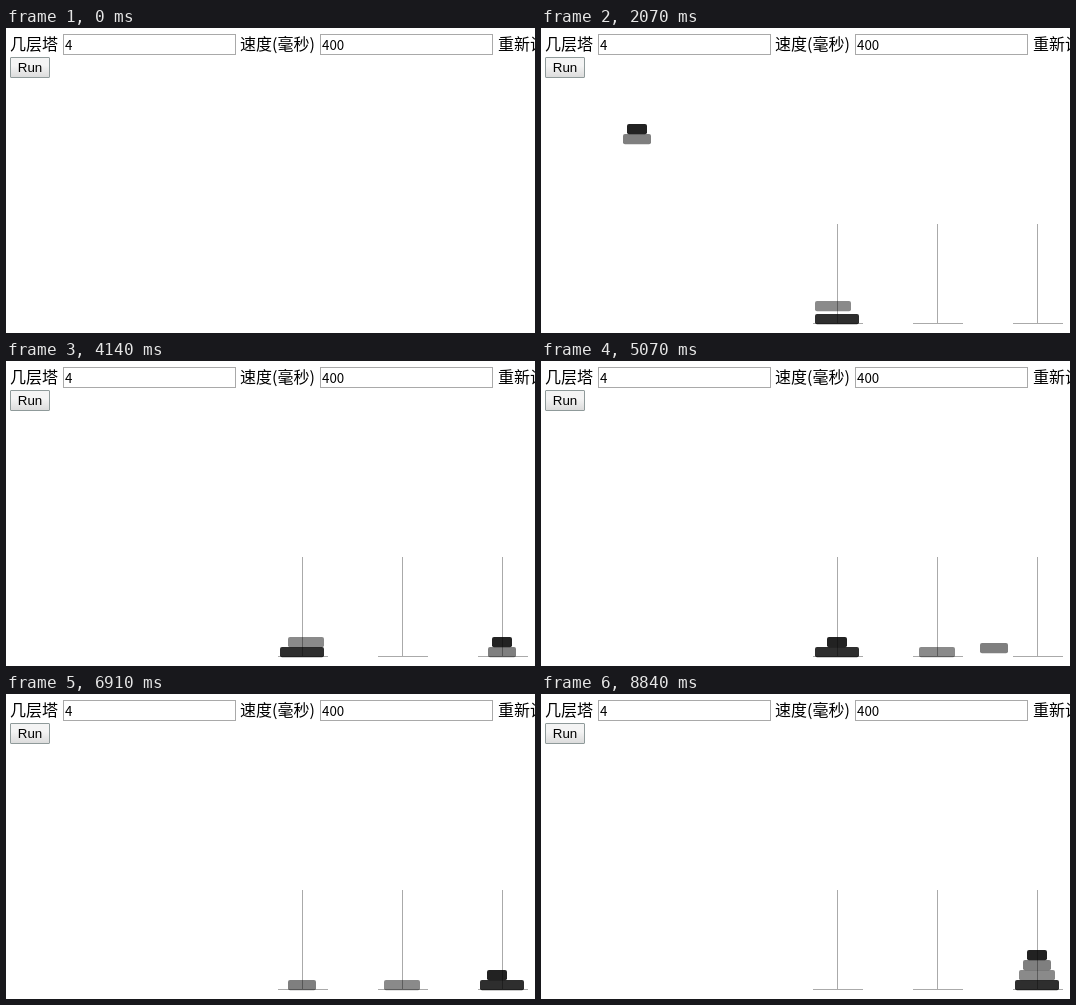
These frames come from a looping animation (529 px wide and 305 px high, 9.53 s). An HTML page:

```html
<!DOCTYPE html>
<html lang="zh-CN">
<head>
<meta charset="utf-8">
<title>Tower of Hanoi</title>
<style>
  html, body { margin: 0; width: 100%; height: 100%; overflow: hidden; background: #fff; }
  #stage { position: relative; width: 529px; height: 305px; overflow: hidden; }
  #stage > * { position: absolute; box-sizing: border-box; white-space: nowrap; }
  .label { top: 3px; font: 16px/24px "Noto Sans CJK SC", "Noto Sans CJK", sans-serif; color: #000; }
  .field {
    top: 6px; width: 173px; height: 21px; padding-left: 1px;
    border: 1px solid #a9a9a9; color: #000;
    font: 13.33px/19px "Noto Sans CJK SC", "Noto Sans CJK", sans-serif;
  }
  #run {
    left: 4px; top: 29px; width: 40px; height: 21px; text-align: center;
    border: 1px solid #8f9a9a; border-radius: 1px;
    background: linear-gradient(#f4f4f4 40%, #dcdcdc);
    font: 13.33px/19px "Liberation Sans", Arial, sans-serif; color: #000;
  }
  #run.hover { border-color: #6f8088; background: linear-gradient(#f8f8f8 40%, #e4e4e4); }
  #run.down { border-color: #5f6f78; background: linear-gradient(#d8d8d8, #ececec); }
  svg { left: 0; top: 0; }
</style>
</head>
<body>
<div id="stage">
  <span class="label" style="left:4px">几层塔</span>
  <span class="field" style="left:57px">4</span>
  <span class="label" style="left:234px">速度(毫秒)</span>
  <span class="field" style="left:314px">400</span>
  <span class="label" style="left:492px">重新设置</span>
  <span id="run">Run</span>
  <svg width="529" height="305">
    <g id="tower">
      <path id="pegs" fill="#aaa" shape-rendering="crispEdges"/>
    </g>
    <path id="cursor" d="M.5 .5V16.5L4.2 13L6.6 18.5L9 17.5L6.6 12.2H11.5Z"
      fill="#fff" stroke="#000" stroke-linejoin="round"/>
  </svg>
</div>
<script>
const LOOP = 9530;
const START = 1365, STEP = 77, LAST_STEP = 97;
const ENTER = 70, ENTER_STEP = 76;
const ALPHA = [0.867, 0.5, 0.46, 0.82];
const SIZE = ALPHA.length;
const PEG_X = [296, 396, 496];

const byId = id => document.getElementById(id);
const tower = byId("tower"), run = byId("run"), cursor = byId("cursor");
const swing = p => 0.5 - Math.cos(Math.PI * p) / 2;
const mix = (a, b, p) => a.map((v, i) => Math.round(v + (b[i] - v) * p));

byId("pegs").setAttribute("d",
  PEG_X.map(x => `M${x} 196h1v99h-1zM${x - 24} 295h50v1h-50z`).join(""));

const disks = ALPHA.map((alpha, i) => {
  const rect = document.createElementNS("http://www.w3.org/2000/svg", "rect");
  const attrs = { width: 20 + 8 * i, height: 10.2, rx: 2, "fill-opacity": alpha };
  for (const key in attrs) rect.setAttribute(key, attrs[key]);
  return tower.appendChild(rect);
});

// Each disk first flies to the left peg, then the puzzle is solved.
const home = disks.map((_, i) => [86 - 4 * i, 96 + 10 * i]);
const moves = [];
const stacks = [[], [], []];
const now = home.slice();

function move(disk, peg) {
  const to = [PEG_X[peg] - 10 - 4 * disk, 286 - 10 * stacks[peg].length];
  moves.push({ disk, from: now[disk], to });
  stacks[peg].push(disk);
  now[disk] = to;
}

function solve(n, from, via, to) {
  if (!n) return;
  solve(n - 1, from, to, via);
  move(stacks[from].pop(), to);
  solve(n - 1, via, from, to);
}

for (let d = SIZE - 1; d >= 0; d--) move(d, 0);
solve(SIZE, 0, 1, 2);

function drawTower(step) {
  tower.style.display = step < 0 ? "none" : "";
  if (step < 0) return;
  const progress = step >= LAST_STEP ? moves.length : 0.168 + 0.1935 * step;
  const pos = home.slice();
  moves.forEach(({ disk, from, to }, i) => {
    if (progress > i) pos[disk] = mix(from, to, swing(Math.min(1, progress - i)));
  });
  disks.forEach((rect, i) => {
    rect.setAttribute("x", pos[i][0]);
    rect.setAttribute("y", pos[i][1]);
  });
}

function cursorAt(t, step) {
  if (t < ENTER || step > 8) return null;
  if (step > 1) return mix([21, 32], [250, 300], swing((step - 1) / 7));
  if (t >= 990) return [21, 32];
  const enter = Math.min(8, Math.floor((t - ENTER) / ENTER_STEP));
  return mix([430, 290], [22, 29], swing(enter / 8));
}

function draw(t) {
  const step = Math.min(LAST_STEP, Math.floor((t - START) / STEP));
  drawTower(step);

  const tip = cursorAt(t, step);
  cursor.style.display = tip ? "" : "none";
  if (tip) cursor.setAttribute("transform", `translate(${tip})`);

  const over = t >= ENTER + 8 * ENTER_STEP && step < 2;
  run.className = !over ? "" : t >= 1220 && step < 0 ? "down" : "hover";
}

const begin = performance.now();
function tick() {
  draw((performance.now() - begin) % LOOP);
  requestAnimationFrame(tick);
}
draw(0);
requestAnimationFrame(tick);
</script>
</body>
</html>
```
